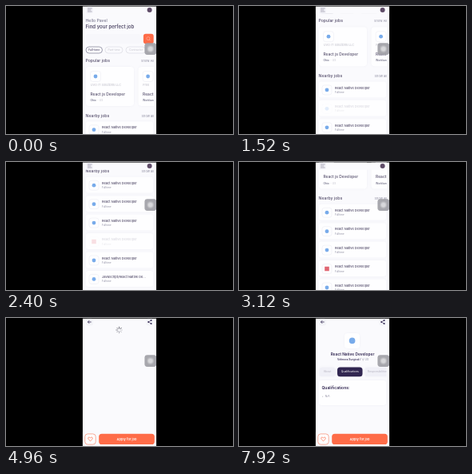
Write an HTML page with a canvas that moves like this. It is 284 by 160 pixels and loops after 8000 ms.

```html
<!DOCTYPE html>
<html lang="en">
<head>
<meta charset="utf-8">
<title>Job search app</title>
<style>
  html, body { margin: 0; width: 100%; height: 100%; overflow: hidden; background: #000; }
  canvas { display: block; width: 100vw; height: 100vh; }
</style>
</head>
<body>
<canvas id="stage"></canvas>
<script>
const W = 284, H = 160, LOOP = 8000;
const LEFT = 95.8, RIGHT = 188.2, TOP = 0.8;
const canvas = document.getElementById('stage');
const ctx = canvas.getContext('2d');

const C = {
  bg: '#fafafd', white: '#fefeff', navy: '#312651', title: '#564f6c', slate: '#66657e',
  gray: '#908fa2', pale: '#c6c5ce', tab: '#f0f0f7', line: '#ececf4',
  orange: '#fe6c48', blue: '#78abea', red: '#e06672'
};

// Scroll position of the home list: [time, offset]
const SCROLL = [[0, 0], [240, 0], [960, 49.5], [1500, 49.5], [2080, 125.5], [2420, 125.5], [3000, 91.5]];
// Finger held on a list row: [row, start, end]
const PRESSES = [[1, 1380, 1720], [3, 2280, 2600], [0, 3640, 3860]];
const PUSH = [3760, 4260];
const LOADED = 5400;
const TAB_PRESS = 6880, TAB_SWITCH = 7040;

const clamp = v => Math.max(0, Math.min(1, v));
const ease = v => v * v * (3 - 2 * v);
const easeOut = v => 1 - (1 - v) ** 3;
const ramp = (t, a, b) => clamp((t - a) / (b - a));

function track(keys, t) {
  for (let i = 1; i < keys.length; i++) {
    const [t0, v0] = keys[i - 1], [t1, v1] = keys[i];
    if (t < t1) return v0 + (v1 - v0) * ease(ramp(t, t0, t1));
  }
  return keys[keys.length - 1][1];
}

function box(x, y, w, h, r, fill, stroke, lw = 0.5) {
  ctx.beginPath();
  ctx.roundRect(x, y, w, h, r);
  if (fill) { ctx.fillStyle = fill; ctx.fill(); }
  if (stroke) { ctx.strokeStyle = stroke; ctx.lineWidth = lw; ctx.stroke(); }
}

function dot(x, y, r, fill) {
  ctx.beginPath();
  ctx.arc(x, y, r, 0, Math.PI * 2);
  ctx.fillStyle = fill;
  ctx.fill();
}

function path(points, color, lw) {
  ctx.beginPath();
  points.forEach(([x, y], i) => i ? ctx.lineTo(x, y) : ctx.moveTo(x, y));
  ctx.strokeStyle = color;
  ctx.lineWidth = lw;
  ctx.stroke();
}

// y is the vertical middle of the letters
function text(str, x, y, size, color, weight = 400, align = 'left') {
  ctx.font = `${weight} ${size}px Inter, "Open Sans", sans-serif`;
  ctx.textAlign = align;
  ctx.fillStyle = color;
  ctx.fillText(str, x, y + size * 0.33);
}

function card(x, y, w, h, r = 3) {
  ctx.save();
  ctx.shadowColor = 'rgba(90, 90, 140, 0.06)';
  ctx.shadowBlur = 3 * canvas.width / W;
  box(x, y, w, h, r, C.white);
  ctx.restore();
}

function clip(x, y, w, h, draw) {
  ctx.save();
  ctx.beginPath();
  ctx.rect(x, y, w, h);
  ctx.clip();
  draw();
  ctx.restore();
}

function badge(x, y, size) {
  box(x - size / 2, y - size / 2, size, size, 3, C.white, C.line, 0.6);
}

function heading(label, link, y) {
  text(label, 99.5, y, 5.15, C.title, 500);
  text(link, 185, y, 3.9, C.gray, 400, 'right');
}

function chip(label, x, w, on) {
  box(x, 51, w, 8, 4, null, on ? C.slate : C.pale, on ? 0.6 : 0.4);
  text(label, x + w / 2, 55, 3.4, on ? C.title : C.pale, on ? 500 : 400, 'center');
}

function popular(x, company, title, place, region) {
  card(x, 76, 60, 49, 4);
  badge(x + 12, 88, 13);
  dot(x + 12, 88, 2.4, C.blue);
  text(company, x + 5.7, 99, 3.8, '#bdbcc6');
  text(title, x + 5.5, 110, 4.9, C.title, 500);
  text(place, x + 5.5, 118, 3.3, C.slate, 500);
  text(region, x + 14.3, 118, 3.3, C.pale);
}

function row(i, t) {
  const y = 152.2 + i * 23.45;
  let alpha = 1;
  for (const [n, a, b] of PRESSES) {
    if (n === i) alpha = 1 - 0.8 * ramp(t, a, a + 100) * (1 - ramp(t, b, b + 160));
  }
  card(100, y - 8, 84, 20);
  ctx.save();
  ctx.globalAlpha = alpha;
  badge(110, y + 2.5, 12);
  if (i === 3) box(107.2, y - 0.3, 5.6, 5.6, 0, C.red);
  else dot(110, y + 2.5, 2.4, C.blue);
  text(i === 5 ? 'JavaScript/React Native De…' : 'React Native Developer', 120, y, 3.93, C.title, 500);
  text('Fulltime', 120, y + 5.5, 3.15, C.gray);
  ctx.restore();
}

function home(t) {
  box(LEFT, 0, RIGHT - LEFT, H, 0, C.bg);
  ctx.save();
  ctx.translate(0, -track(SCROLL, t));
  text('Hello Pavel', 99.5, 18, 5.2, C.slate);
  text('Find your perfect job', 99.5, 26, 6.05, C.title, 600);
  box(100, 35, 68.5, 12, 3, '#f7f7fb');
  box(171.9, 34.7, 12.8, 12.6, 3, C.orange);
  ctx.beginPath();
  ctx.arc(177.9, 40.6, 2, 0, Math.PI * 2);
  ctx.strokeStyle = '#ffb8a4';
  ctx.lineWidth = 0.6;
  ctx.stroke();
  path([[179.3, 42], [180.7, 43.4]], '#ffb8a4', 0.6);
  chip('Full-time', 100, 20.5, true);
  chip('Part-time', 124, 22, false);
  chip('Contractor', 150, 25, false);

  heading('Popular jobs', 'Show All', 68.5);
  clip(98, 70, 87, 60, () => {
    popular(100, 'UVO IT Solutions LLC', 'React js Developer', 'Ohio', '- US');
    popular(165.6, 'Free', 'React Native Developer', 'Worklune', '');
  });
  heading('Nearby jobs', 'Show all', 137.3);
  for (let i = 0; i < 6; i++) row(i, t);
  ctx.restore();

  box(LEFT, 0, RIGHT - LEFT, 9.7, 0, C.bg);
  box(100, 0.8, 9, 8.6, 2, '#f4f4f9');
  [[3, 107.6], [5, 106.4], [7, 107.6]].forEach(([y, x]) => path([[102, y], [x, y]], C.gray, 0.7));
  dot(179.6, 5, 3, '#5f4c68');
}

function detailBar() {
  box(100, 0.8, 9, 8.8, 2, '#f3f4f8');
  box(175.4, 0.8, 9, 8.8, 2, '#f3f4f8');
  path([[106.7, 5], [102.4, 5]], C.navy, 0.8);
  path([[104.2, 3.2], [102.4, 5], [104.2, 6.8]], C.navy, 0.8);
  const nodes = [[181.6, 3], [178.2, 5], [181.6, 7]];
  path(nodes, C.navy, 0.6);
  nodes.forEach(([x, y]) => dot(x, y, 0.95, C.navy));
}

function spinner(t) {
  const step = Math.floor(t / 100);
  ctx.lineCap = 'round';
  for (let i = 0; i < 8; i++) {
    const a = i * Math.PI / 4;
    const age = ((step - i) % 8 + 8) % 8;
    const sx = Math.sin(a), sy = -Math.cos(a);
    path([[141.6 + sx * 2, 15 + sy * 2], [141.6 + sx * 3.8, 15 + sy * 3.8]],
      `rgba(75, 75, 88, ${0.9 - age * 0.09})`, 1);
  }
  ctx.lineCap = 'butt';
}

function footer() {
  box(LEFT, 142.5, RIGHT - LEFT, 18, 0, C.bg);
  box(98.8, 144.9, 13.4, 13.2, 3.5, C.white, '#f58a70', 0.7);
  ctx.beginPath();
  ctx.moveTo(105.5, 153.7);
  ctx.bezierCurveTo(101, 150.8, 102.6, 147.7, 105.5, 149.8);
  ctx.bezierCurveTo(108.4, 147.7, 110, 150.8, 105.5, 153.7);
  ctx.strokeStyle = C.orange;
  ctx.lineWidth = 0.7;
  ctx.stroke();
  box(116.2, 144.7, 69.6, 13.4, 3.6, C.orange);
  text('Apply for job', 151, 151.3, 4, C.white, 600, 'center');
}

function tab(label, x, w, on, alpha = 1) {
  ctx.save();
  ctx.globalAlpha = alpha;
  card(x, 61.5, w, 11.8, 3.6);
  box(x, 61.5, w, 11.8, 3.6, on ? C.navy : C.tab);
  text(label, x + w / 2, 67.3, 3.4, on ? C.white : '#b7b5c2', 400, 'center');
  ctx.restore();
}

function about() {
  card(100, 78, 84, 86);
  text('About the job:', 103.5, 87.2, 5, C.navy, 600);
  text('Job Description', 103.5, 98.4, 3.25, C.gray);
  [
    'Joining Velmora Surgical means joining a team',
    'dedicated to using technology to benefit',
    'patients by improving surgical efficacy and',
    'decreasing surgical invasiveness, with patient',
    'safety as our highest priority.'
  ].forEach((line, i) => text(line, 103.5, 107.2 + i * 4.6, 3.25, C.gray));
  text('Primary Function of Position:', 103.5, 135, 3.25, C.gray);
}

function qualifications() {
  card(100, 78, 84, 31);
  text('Qualifications:', 103.5, 87.2, 5, C.navy, 600);
  dot(104.6, 98.2, 0.6, C.pale);
  text('N/A', 107.8, 98.2, 3.25, C.gray);
}

function job(t) {
  const second = t >= TAB_SWITCH;
  card(132, 19, 19, 19, 4);
  dot(141.6, 28.4, 3.8, C.blue);
  text('React Native Developer', 142, 45, 4.85, C.navy, 600, 'center');
  text('Velmora Surgical /', 123, 52.2, 3.4, C.navy, 500);
  dot(155.2, 51.6, 1, C.pale);
  path([[155.2, 52], [155.2, 53.8]], C.pale, 0.7);
  text('US', 157.4, 52.2, 3.35, C.gray);
  const press = ramp(t, TAB_PRESS, TAB_PRESS + 80) * (1 - ramp(t, TAB_SWITCH, TAB_SWITCH + 200));
  clip(98, 58, 86.5, 19, () => {
    tab('About', 100.5, 20, !second);
    tab('Qualifications', 123, 31.5, second, 1 - 0.7 * press);
    tab('Responsibilities', 157.3, 32, false);
  });
  (second ? qualifications : about)();
}

function detail(t) {
  box(LEFT, 0, RIGHT - LEFT, H, 0, C.bg);
  if (t < LOADED) spinner(t);
  else job(t);
  detailBar();
  footer();
}

function assistButton() {
  box(173.4, 46.2, 14.8, 14.8, 3.4, 'rgba(160, 160, 166, 0.92)');
  dot(180.7, 53.6, 4.6, 'rgba(255, 255, 255, 0.14)');
  dot(180.7, 53.6, 3.6, 'rgba(255, 255, 255, 0.22)');
  dot(180.7, 53.6, 2.7, 'rgba(255, 255, 255, 0.3)');
}

function shifted(dx, draw) {
  ctx.save();
  ctx.translate(dx, 0);
  draw();
  ctx.restore();
}

function draw(t) {
  ctx.setTransform(canvas.width / W, 0, 0, canvas.height / H, 0, 0);
  ctx.fillStyle = '#000';
  ctx.fillRect(0, 0, W, H);
  const push = easeOut(ramp(t, ...PUSH));
  clip(LEFT, TOP, RIGHT - LEFT, H, () => {
    if (push < 1) shifted(-28 * push, () => home(t));
    if (push > 0) shifted((RIGHT - LEFT) * (1 - push), () => detail(t));
    assistButton();
  });
}

function resize() {
  const dpr = window.devicePixelRatio || 1;
  canvas.width = Math.round(innerWidth * dpr);
  canvas.height = Math.round(innerHeight * dpr);
}

function frame() {
  draw(performance.now() % LOOP);
  requestAnimationFrame(frame);
}

addEventListener('resize', resize);
resize();
frame();
</script>
</body>
</html>
```
